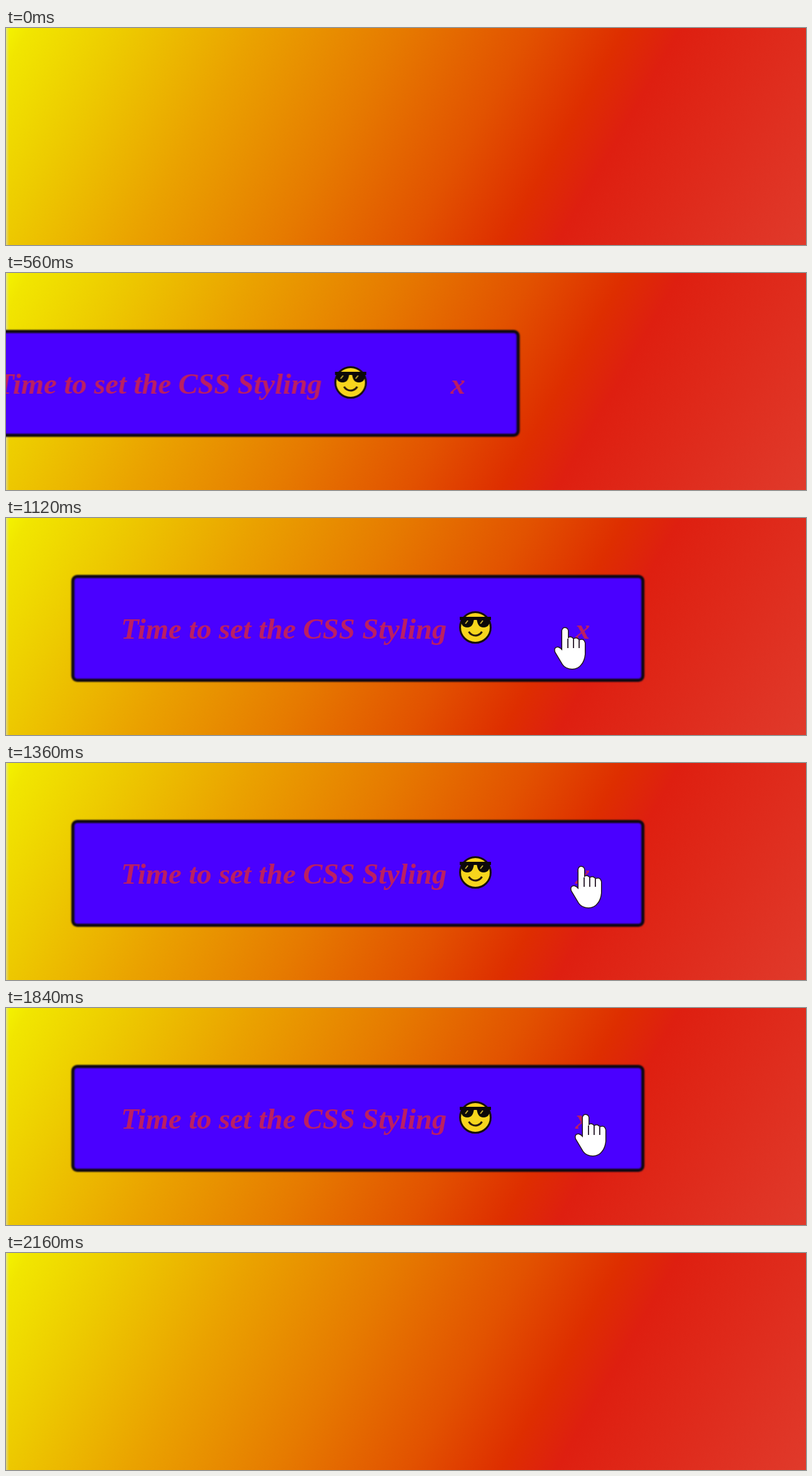
An HTML page with a canvas that plays this animation: 1280x347 px, repeating every 2.24 s.

```html
<!DOCTYPE html>
<html lang="en">
<head>
<meta charset="utf-8">
<title>Sliding notice</title>
<style>
  html, body { margin: 0; width: 100%; height: 100%; overflow: hidden; }
  canvas { display: block; width: 100%; height: 100%; }
</style>
</head>
<body>
<canvas id="stage" width="1280" height="347"></canvas>
<script>
const W = 1280, H = 347, LOOP = 2240, STEP = 80;
const ctx = document.getElementById('stage').getContext('2d');

const clamp01 = v => Math.min(1, Math.max(0, v));
const span = (t, a, b) => clamp01((t - a) / (b - a));

function layer(paint) {
  const c = document.createElement('canvas');
  c.width = W;
  c.height = H;
  paint(c.getContext('2d'));
  return c;
}

function paintBackdrop(g) {
  // A 120 degree gradient, measured corner to corner.
  const dx = Math.sin(Math.PI / 3), dy = 0.5;
  const len = W * dx + H * dy;
  const fill = g.createLinearGradient(0, 0, len * dx, len * dy);
  const stops = [
    [0, '#f4f400'], [0.025, '#f1e600'], [0.13, '#edca00'], [0.27, '#eaa200'],
    [0.43, '#e67a00'], [0.57, '#e25200'], [0.67, '#de2e00'],
    [0.73, '#de1f10'], [1, '#e03a2b']
  ];
  stops.forEach(([at, color]) => fill.addColorStop(at, color));
  g.fillStyle = fill;
  g.fillRect(0, 0, W, H);

  const edge = g.createLinearGradient(0, 0, 5, 0);
  edge.addColorStop(0, 'rgba(220,220,190,0.65)');
  edge.addColorStop(1, 'rgba(220,220,190,0)');
  g.fillStyle = edge;
  g.fillRect(0, 0, 5, H);
}

function paintFace(g) {
  g.save();
  g.translate(751, 175);
  g.beginPath();
  g.arc(0, 0, 24.5, 0, 7);
  g.fillStyle = '#f7d51d';
  g.fill();
  g.lineWidth = 3;
  g.strokeStyle = '#17100c';
  g.stroke();

  g.fillStyle = '#0c0909';
  g.fillRect(-25, -17, 50, 5);
  for (const side of [-1, 1]) {
    g.beginPath();
    g.moveTo(side * 2, -15);
    g.lineTo(side * 23, -15);
    g.bezierCurveTo(side * 24, -5, side * 20, 0, side * 13, 0);
    g.bezierCurveTo(side * 6, 0, side * 3, -5, side * 2, -15);
    g.fill();
  }
  g.strokeStyle = '#c9b030';
  g.lineWidth = 2;
  for (const x of [-16, 8]) {
    g.beginPath();
    g.moveTo(x, -6);
    g.lineTo(x + 4, -11);
    g.stroke();
  }

  g.beginPath();
  g.arc(0, 1, 12, 0.5, Math.PI - 0.5);
  g.lineWidth = 3;
  g.strokeStyle = '#2c1c0c';
  g.stroke();
  g.restore();
}

function paintCard(g) {
  g.filter = 'blur(0.9px)';
  g.beginPath();
  g.roundRect(107, 93.5, 912, 166, 7);
  g.fillStyle = '#4a00ff';
  g.fill();
  g.lineWidth = 5;
  g.strokeStyle = '#0d0812';
  g.stroke();

  g.filter = 'blur(0.7px)';
  g.font = 'italic bold 46.7px "Liberation Serif", "Times New Roman", serif';
  g.fillStyle = '#bb1f62';
  g.fillText('Time to set the CSS Styling', 184, 192.5);
  g.fillText('x', 911, 192.5);
  paintFace(g);
}

function outline(g, width) {
  g.lineJoin = 'round';
  g.lineWidth = width;
  g.strokeStyle = '#24181c';
  g.stroke();
  g.fillStyle = '#fff';
  g.fill();
}

function paintArrow(g) {
  const pts = [[0, 1], [0, 45], [10, 36], [18, 52], [26, 48], [19, 33], [32, 33]];
  g.beginPath();
  pts.forEach(([x, y]) => g.lineTo(x, y));
  g.closePath();
  outline(g, 3);
}

function paintHand(g) {
  g.beginPath();
  g.moveTo(-4, 36);
  g.lineTo(-4, 4);
  g.quadraticCurveTo(-3, 0, 0, 0);
  g.quadraticCurveTo(4, 0, 5, 4);
  g.lineTo(5, 17);
  g.quadraticCurveTo(9, 12, 14, 18);
  g.quadraticCurveTo(19, 14, 23, 20);
  g.quadraticCurveTo(30, 16, 32, 24);
  g.lineTo(32, 42);
  g.quadraticCurveTo(31, 52, 26, 58);
  g.quadraticCurveTo(21, 65, 12, 65);
  g.quadraticCurveTo(2, 65, -3, 58);
  g.lineTo(-15, 38);
  g.quadraticCurveTo(-17, 31, -11, 31);
  g.quadraticCurveTo(-7, 32, -4, 36);
  g.closePath();
  outline(g, 3);
  g.beginPath();
  for (const x of [5, 14, 23]) {
    g.moveTo(x, 17);
    g.lineTo(x, 32);
  }
  g.lineWidth = 2;
  g.strokeStyle = '#3a2d3c';
  g.stroke();
}

const backdrop = layer(paintBackdrop);
const card = layer(paintCard);

// Pointer way points: time, x, y of the tip.
const route = [
  [640, 690, 352], [720, 712, 306], [800, 740, 254], [960, 815, 208],
  [1120, 894, 176], [1360, 920, 166], [1600, 927, 165], [1840, 927, 171],
  [2000, 921, 203], [2080, 908, 275], [2160, 890, 360]
];

function pointerAt(t) {
  const i = route.findIndex(p => p[0] > t);
  if (i < 1) return null;
  const [t0, x0, y0] = route[i - 1], [t1, x1, y1] = route[i];
  const k = (t - t0) / (t1 - t0);
  return [x0 + (x1 - x0) * k, y0 + (y1 - y0) * k];
}

function draw(t) {
  ctx.drawImage(backdrop, 0, 0);

  if (t >= 400) {
    const shift = -917 * Math.pow(1 - span(t, 400, 720), 2.2);
    ctx.globalAlpha = 1 - span(t, 1860, 2100);
    ctx.drawImage(card, shift, 0);
    ctx.globalAlpha = 1;
  }

  const tip = pointerAt(t);
  if (tip) {
    ctx.save();
    ctx.filter = 'blur(0.6px)';
    ctx.translate(tip[0], tip[1]);
    const overButton = tip[0] > 870 && tip[1] < 240;
    (overButton ? paintHand : paintArrow)(ctx);
    ctx.restore();
  }
}

const start = performance.now();
function tick() {
  const t = Math.max(0, performance.now() - start) % LOOP;
  draw(Math.floor(t / STEP) * STEP);
  requestAnimationFrame(tick);
}
tick();
</script>
</body>
</html>
```
